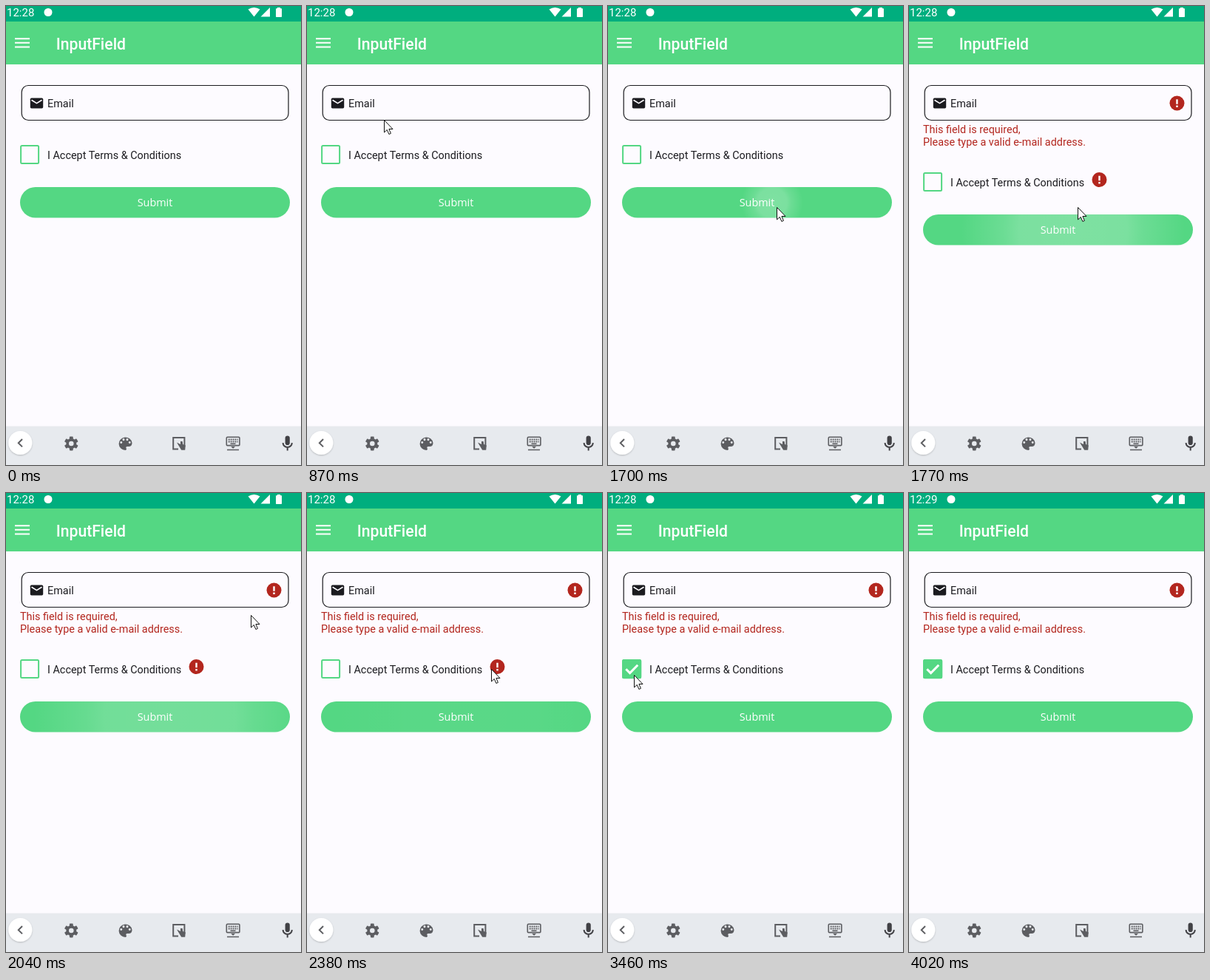
An HTML page for the animation above (4.42 s loop, 399 px wide and 621 px high).

```html
<!DOCTYPE html>
<html lang="en">
<head>
<meta charset="utf-8">
<title>InputField</title>
<style>
  html, body { margin: 0; width: 100%; height: 100%; overflow: hidden; background: #fdfbff; }
  svg { display: block; width: 399px; height: 621px; }
  text { font: 14.4px Roboto, sans-serif; fill: #1b1b1f; }
  .white { fill: #fff; }
  .green { fill: #54d783; }
  .error { fill: #b3261e; }
  .line { fill: none; stroke: #fff; stroke-width: 2; }
  #clock { font-size: 15px; }
  #title { font-size: 21.2px; font-weight: 500; }
  #submit { font-family: "Open Sans", sans-serif; text-anchor: middle; }
  #tools { fill: #5c5d61; }
  #tools .hole { fill: #e7eaee; }
  #tools .line { stroke: #5c5d61; }
  #tools .mic { fill: #414145; }
  #tools .line.mic { fill: none; stroke: #414145; }
</style>
</head>
<body>
<svg viewBox="0 0 399 621">
  <defs>
    <radialGradient id="glow">
      <stop offset="0" stop-color="#fff" stop-opacity=".25"/>
      <stop offset=".48" stop-color="#fff" stop-opacity=".23"/>
      <stop offset=".62" stop-color="#fff" stop-opacity=".14"/>
      <stop offset="1" stop-color="#fff" stop-opacity="0"/>
    </radialGradient>
    <filter id="soft" x="-30%" y="-30%" width="160%" height="160%">
      <feDropShadow dx="0" dy="1" stdDeviation="1" flood-opacity=".22"/>
    </filter>
    <clipPath id="pill"><rect x="19" y="245" width="365" height="41.6" rx="20.8"/></clipPath>
    <g id="alert">
      <circle r="10" class="error"/>
      <path d="M0-5.2V1.2M0 3V5.4" class="line" style="stroke-width: 2.4"/>
    </g>
  </defs>

  <rect width="399" height="621" fill="#fdfbff"/>

  <!-- status bar and header -->
  <rect width="399" height="21" fill="#00ae7e"/>
  <rect y="21" width="399" height="58" class="green"/>
  <text id="clock" class="white" x="1" y="14">12:28</text>
  <circle cx="57" cy="8.5" r="5.5" class="white"/>
  <path class="white" d="M335.5 14.5L327.5 4.6Q335.5-.8 343.5 4.6ZM344.5 14.5L357 2V14.5Z"/>
  <rect class="white" x="365" y="3.2" width="8" height="11.8" rx=".8"/>
  <rect class="white" x="367" y="2" width="4" height="2"/>
  <path class="line" d="M12 44.2h20m-20 5.6h20m-20 5.6h20"/>
  <text id="title" class="white" x="67.7" y="58.5">InputField</text>

  <!-- form -->
  <rect x="21.2" y="107.5" width="360.8" height="47" rx="9" fill="none" stroke="#1b1b1f" stroke-width="1.2"/>
  <rect x="32.8" y="124.5" width="17.4" height="14" rx="1.7" fill="#1b1b1f"/>
  <path class="line" style="stroke: #fdfbff; stroke-width: 1.7" d="M34.5 127.2L41.5 131.6L48.5 127.2"/>
  <text x="56" y="137">Email</text>

  <g id="errors">
    <use href="#alert" x="362.5" y="131.5"/>
    <text class="error" x="19" y="172">This field is required,</text>
    <text class="error" x="19" y="189">Please type a valid e-mail address.</text>
    <use id="termsAlert" href="#alert" x="257.5" y="235"/>
  </g>

  <g id="lower">
    <rect x="20.1" y="189.1" width="24" height="24" rx="1.5" class="line" style="stroke: #54d783"/>
    <g id="check">
      <rect x="19" y="188" width="26.2" height="26.2" rx="2.5" class="green"/>
      <path class="line" style="stroke-width: 3" d="M24.3 201.2l5.3 5.3l10.6-10.7"/>
    </g>
    <text x="56" y="206.5">I Accept Terms &amp; Conditions</text>
    <rect x="19" y="245" width="365" height="41.6" rx="20.8" class="green"/>
    <g clip-path="url(#pill)"><circle id="ripple" cx="222" cy="266" fill="url(#glow)"/></g>
    <text id="submit" class="white" x="201.5" y="271">Submit</text>
  </g>

  <!-- keyboard toolbar -->
  <g id="tools">
    <rect y="568.5" width="399" height="52.5" class="hole"/>
    <circle cx="19.3" cy="591" r="16" class="white" filter="url(#soft)"/>
    <path class="line" d="M22 586l-5.2 5.2l5.2 5.2"/>
    <g id="gear" transform="translate(88.3 592)"><circle r="7"/></g>
    <g id="palette" transform="translate(161.5 592)">
      <path d="M9-1A9 8.8 0 1 0 0 9Q2.2 8.4 1.1 6.5Q0 4 2.6 4H4.5Q9 4 9-1Z"/>
    </g>
    <path class="line" d="M233 599.5h-6.8v-15.6h15.2v12"/>
    <path d="M231 590.5l5 2.5v-4h2.6l.6 4l3.6 1.4l-.6 6.4h-5z"/>
    <rect x="298.3" y="583.2" width="17.6" height="11.4" rx="1.2" class="line" style="stroke-width: 1.6"/>
    <path class="line" stroke-dasharray="1.8 1.1" d="M300.8 586.6h12.8m-12.8 3h12.8"/>
    <path class="line" style="stroke-width: 1.4" d="M303.5 592.2h7m-11.5 8.3h16"/>
    <path d="M304.2 596h5.8l-2.9 2.8z"/>
    <rect class="mic" x="377.6" y="581.5" width="6.2" height="12.5" rx="3.1"/>
    <path class="line mic" d="M374.6 591a6.1 6.1 0 0 0 12.2 0m-6.1 6v4.5"/>
  </g>

  <path id="cursor" d="M.5.5V17L4.3 13.5L6.9 19.5L9.4 18.4L6.9 12.5H12Z" fill="#fff" stroke="#111"/>
</svg>

<script>
const LOOP = 4420, START = 330, STEP = 68.2, SHIFT = 37;
const PRESS = 1668, INVALID = 1760, FADED = 2450, CHECKED = 3320, MINUTE = 3730, LEAVE = 4010;

// pointer stops: ms, x, y
const stops = [
  [330, 298, 600], [600, 90, 172], [870, 104, 154], [1070, 120, 138], [1500, 228, 272],
  [1830, 228, 272], [2140, 368, 126], [2376, 249, 238], [2780, 168, 246], [2990, 220, 244],
  [3260, 33, 240], [3520, 36, 250], [3810, 270, 435], [4010, 350, 620]
];

const el = id => document.getElementById(id);
const show = (id, on) => el(id).style.display = on ? "" : "none";
const set = (id, name, value) => el(id).setAttribute(name, value);
const clamp = v => Math.max(0, Math.min(1, v));
const ease = p => p * p * (3 - 2 * p);
const mix = (a, b, p) => Math.round(a + (b - a) * p);

function pointer(t) {
  const i = Math.max(1, stops.findIndex(s => s[0] > t));
  const [t0, x0, y0] = stops[i - 1], [t1, x1, y1] = stops[i];
  const p = ease(clamp((t - t0) / (t1 - t0)));
  return [mix(x0, x1, p), mix(y0, y1, p)];
}

function buildIcons() {
  for (let i = 0; i < 3; i++)
    el("gear").innerHTML += `<rect x="-2.4" y="-9.4" width="4.8" height="18.8" rx=".8" transform="rotate(${60 * i})"/>`;
  el("gear").innerHTML += '<circle r="3.3" class="hole"/>';
  for (let i = 0; i < 4; i++)
    el("palette").innerHTML += `<circle cx="5.9" r="1.5" class="hole" transform="rotate(${195 + 50 * i})"/>`;
}

function draw(time) {
  const t = START + Math.floor((time % LOOP - START + 6) / STEP) * STEP;
  const invalid = t >= INVALID;

  show("cursor", t >= START && t < LEAVE);
  set("cursor", "transform", `translate(${pointer(t)})`);

  show("errors", invalid);
  show("termsAlert", t < CHECKED);
  show("check", t >= CHECKED);
  set("lower", "transform", `translate(0 ${invalid ? SHIFT : 0})`);

  set("ripple", "r", 185 * clamp((t - PRESS) / 115));
  set("ripple", "opacity", clamp((FADED - t) / 550));

  el("clock").textContent = t >= MINUTE ? "12:29" : "12:28";
}

buildIcons();
const begin = performance.now();
function loop() {
  draw(performance.now() - begin);
  requestAnimationFrame(loop);
}
loop();
</script>
</body>
</html>
```
